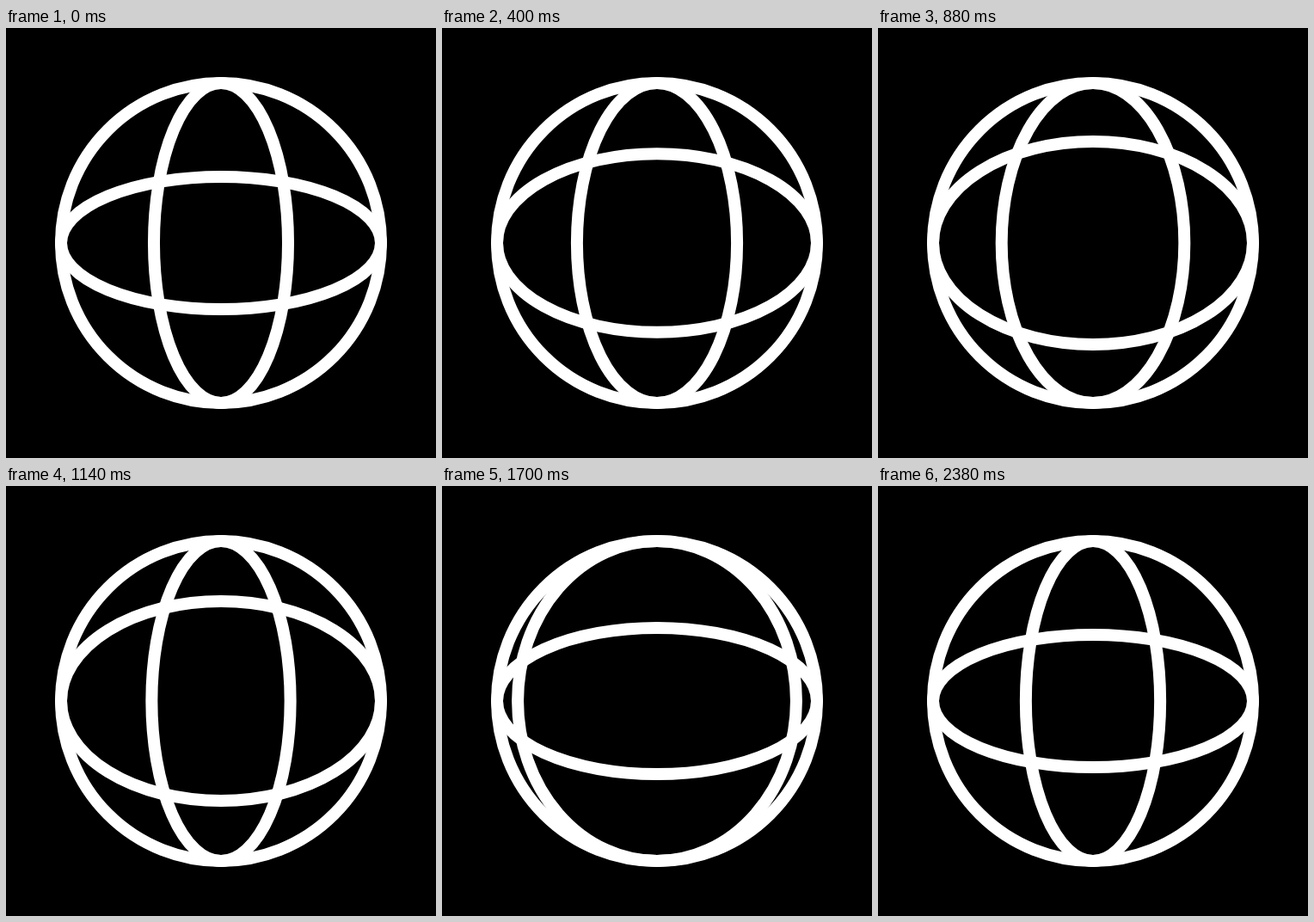
An HTML page that plays this animation: 500x500 px, repeating every 2400 ms.

```html
<!DOCTYPE html>
<html lang="en">
<head>
<meta charset="utf-8">
<title>Spinning globe</title>
<style>
  html, body { margin: 0; width: 100%; height: 100%; overflow: hidden; background: #000; }
  svg { display: block; width: 100%; height: 100%; }
  ellipse { fill: none; stroke: #fff; stroke-width: 14; }
</style>
</head>
<body>
<svg viewBox="0 0 500 500">
  <ellipse cx="250" cy="250" rx="186" ry="186"/>
  <ellipse id="meridian" cx="250" cy="250" ry="186"/>
  <ellipse id="equator" cx="250" cy="250" rx="186"/>
</svg>
<script>
const LOOP = 2400, RADIUS = 186;
const times = [0, 260, 560, 880, 1140, 1700, LOOP];
const spin = [-24.8, 4, 66, 144.9, 205.5, 299.4, 335.2]; // degrees, one full turn
const tilt = [77, 92, 114, 118, 116, 85, 77];            // vertical radius

// Monotone cubic curve through the keys, at rest at both ends
function curve(values) {
  const slope = i => (values[i + 1] - values[i]) / (times[i + 1] - times[i]);
  const tangents = values.map((_, i) => {
    if (i === 0 || i === values.length - 1) return 0;
    const a = slope(i - 1), b = slope(i);
    return a * b > 0 ? 2 * a * b / (a + b) : 0;
  });
  return t => {
    const i = times.findIndex(end => t < end) - 1;
    const span = times[i + 1] - times[i], u = (t - times[i]) / span, v = 1 - u;
    return values[i] * v * v * (1 + 2 * u) + values[i + 1] * u * u * (3 - 2 * u)
      + span * u * v * (tangents[i] * v - tangents[i + 1] * u);
  };
}

const spinAt = curve(spin), tiltAt = curve(tilt);
const meridian = document.getElementById('meridian');
const equator = document.getElementById('equator');

function draw() {
  const t = performance.now() % LOOP;
  meridian.setAttribute('rx', Math.abs(RADIUS * Math.sin(spinAt(t) * Math.PI / 180)));
  equator.setAttribute('ry', tiltAt(t));
  requestAnimationFrame(draw);
}
draw();
</script>
</body>
</html>
```
